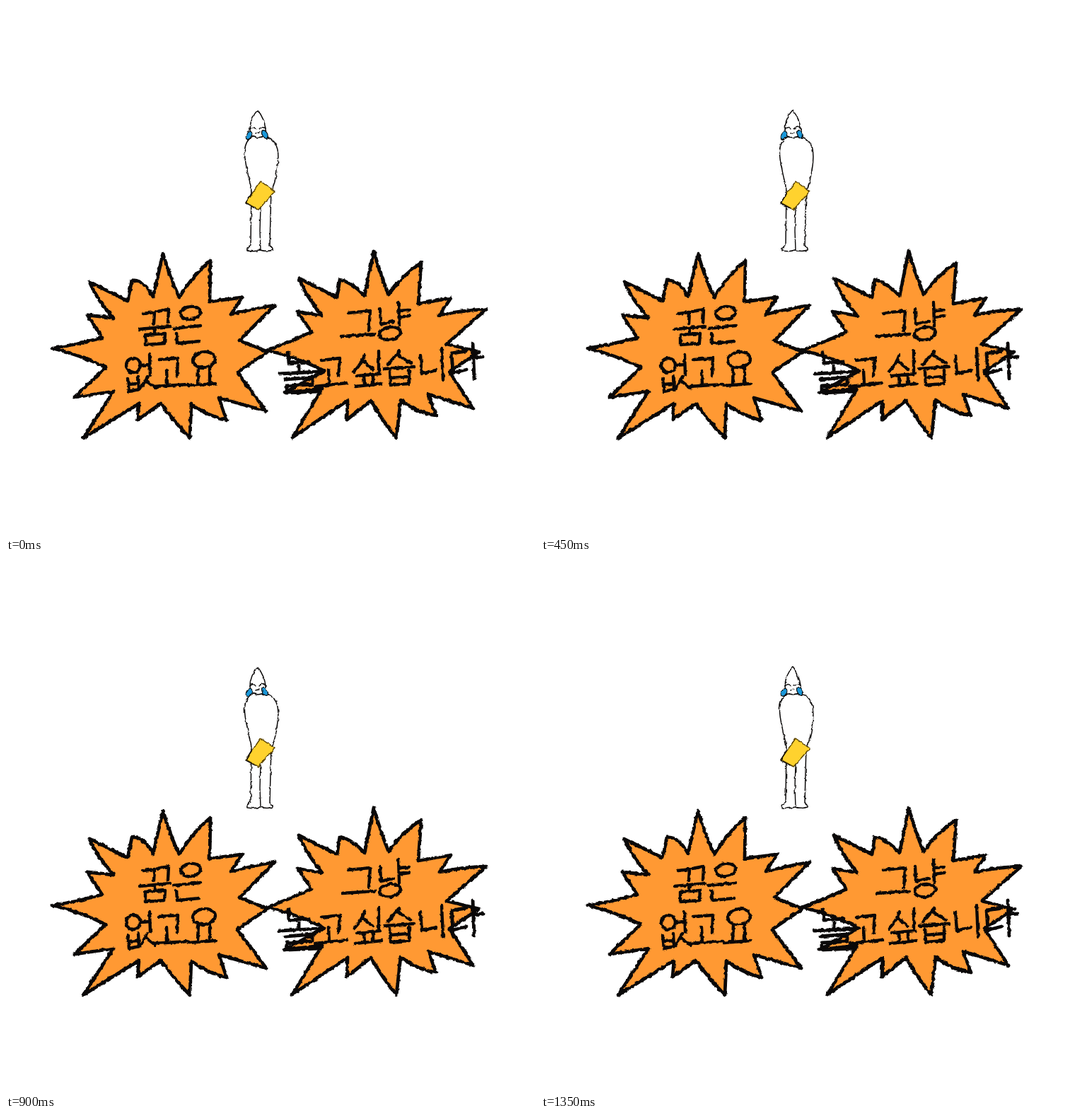
An HTML page without scripts for the animation above (1500 ms loop, 748x748 px).

```html
<!DOCTYPE html>
<html lang="ko">
<head>
<meta charset="utf-8">
<title>꿈은 없고요</title>
<style>
html, body { margin: 0; width: 100%; height: 100%; overflow: hidden; background: #fff; }
svg { display: block; width: 100vw; height: 100vh; }
path, ellipse { stroke: #0a0808; stroke-linecap: round; stroke-linejoin: round; }
.burst { fill: #ff9933; stroke-width: 4.8; }
.word { fill: none; stroke-width: 4.4; }
.bold { stroke-width: 4.9; }
.body { fill: #fff; stroke-width: 1.5; }
.line { fill: none; stroke-width: 1.4; }
.tear { fill: #1a97d8; stroke-width: 1.2; }
.card { fill: #ffd22e; stroke: #5a4300; stroke-width: 1.5; }
</style>
</head>
<body>
<svg viewBox="0 0 748 748">
  <defs>
    <!-- hand-drawn wobble, redrawn ten times per loop -->
    <filter id="crayon" filterUnits="userSpaceOnUse" x="0" y="0" width="748" height="748" color-interpolation-filters="sRGB">
      <feTurbulence type="fractalNoise" baseFrequency=".17" numOctaves="2" seed="1">
        <animate attributeName="seed" values="1;2;3;4;5;6;7;8;9;10" calcMode="discrete" dur="1.5s" repeatCount="indefinite"/>
      </feTurbulence>
      <feDisplacementMap in="SourceGraphic" scale="4" xChannelSelector="R" yChannelSelector="G"/>
      <feGaussianBlur stdDeviation=".35"/>
    </filter>
    <filter id="pen" filterUnits="userSpaceOnUse" x="300" y="130" width="120" height="230" color-interpolation-filters="sRGB">
      <feTurbulence type="fractalNoise" baseFrequency=".15" numOctaves="2" seed="21">
        <animate attributeName="seed" values="21;22;23;24;25;26;27;28;29;30" calcMode="discrete" dur="1.5s" repeatCount="indefinite"/>
      </feTurbulence>
      <feDisplacementMap in="SourceGraphic" scale="3.5" xChannelSelector="R" yChannelSelector="G"/>
    </filter>
  </defs>

  <g filter="url(#pen)">
    <!-- legs and feet -->
    <path class="body" d="M347 258L346 338Q340 342 341 346Q351 348 359 345Q369 348 377 345Q378 342 373 339L375 258Z"/>
    <path class="line" d="M360 284L359 318L360 345"/>
    <!-- torso -->
    <path class="body" d="M347 263C347 253 343 245 341 232C337 215 333 192 349 185H369C386 191 387 210 383 232C382 244 378 253 376 263"/>
    <!-- hooded head -->
    <path class="body" d="M356 147C349 154 345 165 345 174L346 183Q356 189 367 183L367 173C366 164 361 154 356 147Z"/>
    <path class="line" d="M345 174Q350 169 353 174M358 174Q362 169 367 173M353 180L358 179"/>
    <ellipse class="tear" cx="343.500" cy="183" rx="3.600" ry="6" transform="rotate(30 343.5 183)"/>
    <ellipse class="tear" cx="366" cy="181.500" rx="3.600" ry="6.500" transform="rotate(-30 366 181.5)"/>
    <path class="card" d="M360 248L380 262L357 288L339 278Z"/>
    <path class="line" d="M347 265L339 279L352 286"/>
  </g>

  <g filter="url(#crayon)">
    <path class="burst" d="M66 484L100 478L136 469L115 437L152 441Q128 415 118 390L172 417L178 388Q194 386 208 411L222 350Q231 383 245 412Q263 382 289 360L288 418L334 412L318 436Q350 428 380 423L330 473L370 489L327 518L368 573L301 554L312 586Q286 580 262 563L260 611Q238 588 219 562L186 585L188 562L109 611L152 545L97 553L141 511Q104 493 66 484Z"/>
    <path class="burst" d="M369 487L402 474L432 461L412 432L447 438Q424 410 414 385L468 412L472 387Q490 391 507 410L520 346Q529 379 541 408Q560 381 587 363L583 421L629 413L613 437Q647 430 679 429L623 478L669 489L627 517L661 569L597 549L608 579Q581 575 558 557L552 611Q532 586 516 558L482 585L483 558L405 610L447 541L393 547L450 516Q408 495 369 487Z"/>

    <g class="word" role="img" aria-label="꿈은 없고요">
      <path d="M194 435L210 433L209 449M214 432L230 429L229 448M189 457L232 453M210 456V463M197 465L225 463L224 477L197 479Z"/>
      <ellipse cx="261" cy="434" rx="14" ry="9" transform="rotate(-8 261 434)"/>
      <path d="M237 456L275 452M241 463L242 477L273 474"/>
      <ellipse cx="180" cy="508" rx="10" ry="10"/>
      <path d="M191 508L203 507M203 493L204 522M172 527L174 545L188 542L187 524M173 535L187 534M200 524L190 541M198 530L211 540"/>
      <path d="M216 500L243 498L242 523M227 515L228 535M209 538L257 535"/>
      <ellipse cx="280" cy="500" rx="16" ry="11" transform="rotate(-8 280 500)"/>
      <path d="M272 512L271 534M288 511V533M258 537L296 534"/>
    </g>

    <g class="word" role="img" aria-label="그냥 놀고 싶습니다">
      <path d="M484 434L515 431L513 459M475 467L521 464"/>
      <path d="M529 429L530 450L548 446M555 419L556 452M556 431L570 430M556 440L570 438"/>
      <ellipse cx="543" cy="463" rx="15" ry="9" transform="rotate(-8 543 463)"/>
      <path class="bold" d="M399 490L400 505L428 503M414 505V516M387 520L444 517M395 528L433 525V535L397 537V547L440 545"/>
      <path d="M446 501L472 498L470 523M456 515L457 535M437 538L482 533"/>
      <path d="M507 493Q502 507 492 517M505 502L519 514M527 488V517M496 523L529 520M506 523L507 535M519 522V534M494 538L531 534"/>
      <path d="M556 488L540 507M555 494L573 505M535 513L577 510M543 517L544 536L570 534V515M544 526L569 524"/>
      <path d="M586 494L588 520L608 515M616 484L618 529"/>
      <path class="bold" d="M651 488L630 491L632 519L651 514M660 477L662 527M661 497L674 496"/>
    </g>
  </g>
</svg>
</body>
</html>
```
